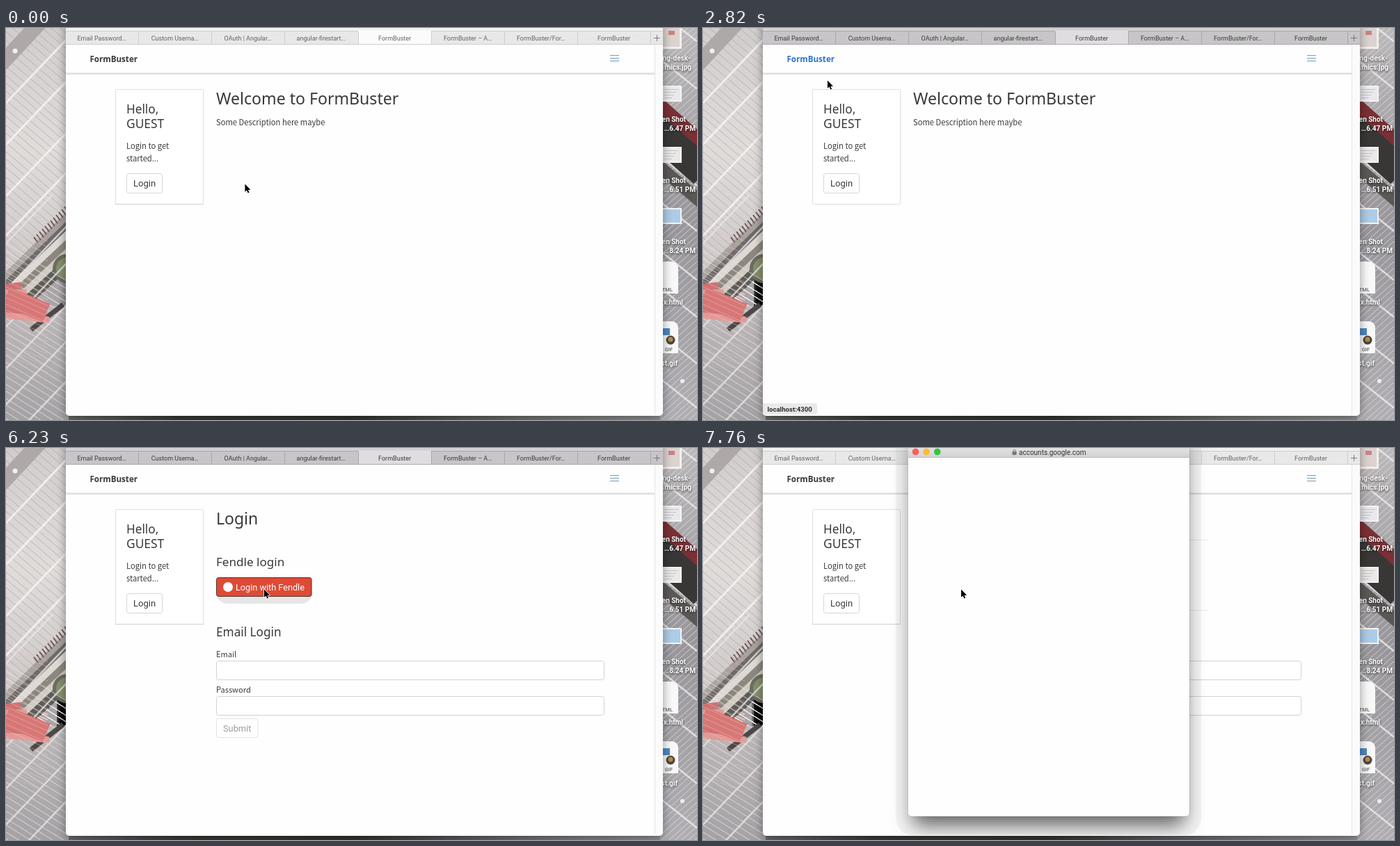
Recreate the animation shown at these times as an HTML page with a canvas. Size 993 by 564 pixels, loop 8 s.

```html
<!DOCTYPE html>
<html lang="en">
<head>
<meta charset="utf-8">
<title>FormBuster</title>
<style>
html, body { margin: 0; width: 100%; height: 100%; overflow: hidden; background: #aaa6a8; }
canvas { display: block; width: 993px; height: 564px; }
</style>
</head>
<body>
<canvas id="stage" width="993" height="564"></canvas>
<script>
const W = 993, H = 564, LOOP = 8000;
const WIN = { x: 86, w: 858, bottom: 558 };
const POP = { x: 294.5, w: 404.5, bottom: 530 };
const COL = 302, CARD = 173;

// Moments at which the page changes, in ms
const AT = {
  focus: 1030, hover: 1330, leave: 2970, status: 3110, loginHot: 3700, loginHand: 4000,
  page: 4600, loginCool: 5190, buttonHot: 5490, buttonHand: 5790, press: 6090,
  popup: 6380, popupReady: 6560, redirect: 7010, accounts: 7610
};
const during = (t, from, to) => t >= from && t < to;

const HEAD = '"Noto Sans", "Open Sans", sans-serif';
const BODY = '"Noto Sans CJK JP", "Noto Sans CJK SC", "Noto Sans", sans-serif';
const UI = 'Roboto, Inter, sans-serif';
const INK = '#373a3c';

let g = document.getElementById('stage').getContext('2d');

function text(s, x, y, size, family, color = INK, weight = 400, align = 'left') {
  g.font = `${weight} ${size}px ${family}`;
  g.fillStyle = color;
  g.textAlign = align;
  g.fillText(s, x, y);
}

function rect(x, y, w, h, color) {
  g.fillStyle = color;
  g.fillRect(x, y, w, h);
}

function box(x, y, w, h, r, fill, stroke) {
  g.beginPath();
  g.roundRect(x, y, w, h, r);
  if (fill) { g.fillStyle = fill; g.fill(); }
  if (stroke) { g.strokeStyle = stroke; g.lineWidth = 1; g.stroke(); }
}

function dot(x, y, r, color) {
  g.beginPath();
  g.arc(x, y, r, 0, Math.PI * 2);
  g.fillStyle = color;
  g.fill();
}

function line(color, width, x1, y1, x2, y2) {
  g.beginPath();
  g.moveTo(x1, y1);
  g.lineTo(x2, y2);
  g.strokeStyle = color;
  g.lineWidth = width;
  g.stroke();
}

function shadow(color, blur, dy) {
  g.shadowColor = color;
  g.shadowBlur = blur;
  g.shadowOffsetY = dy;
}

function fade(x, y, w, h, across, ...colors) {
  const f = across ? g.createLinearGradient(x, 0, x + w, 0) : g.createLinearGradient(0, y, 0, y + h);
  colors.forEach((c, i) => f.addColorStop(i / (colors.length - 1), c));
  rect(x, y, w, h, f);
}

function clipped(x, y, w, h, paint) {
  g.save();
  g.beginPath();
  g.rect(x, y, w, h);
  g.clip();
  paint();
  g.restore();
}

let seed = 7;
function random() {
  seed = (seed * 16807) % 2147483647;
  return seed / 2147483647;
}

// Parallel roof ribs: slanted lines with slightly uneven spacing
function ribs(x, w, top, bottom, slope, gap, color, width) {
  for (let y = top - 90; y < bottom + 90; y += gap * (0.85 + random() * 0.3)) {
    line(color, width, x, y, x + w, y + slope * w);
  }
}

function paintLeft() {
  fade(0, 0, 90, 350, false, '#d2cdcd', '#e0dcda', '#cdc9c8');
  clipped(0, 0, 90, 350, () => {
    ribs(0, 90, 0, 350, 0.85, 12, 'rgba(150,142,143,.5)', 1);
    ribs(0, 90, 0, 350, -1.05, 66, 'rgba(246,244,243,.85)', 3);
    line('#aea8a9', 22, 60, -20, -10, 55);
  });
  clipped(0, 240, 90, H - 240, () => {
    const stands = ['#a8a29e', '#6f6a67', '#ddd9d4', '#8c8880', '#d0ccc3', '#5d5c56'];
    stands.forEach((c, i) => line(c, 14, -5, 365 + i * 12, 95, 267 + i * 13));
    for (let i = 0; i < 12; i++) line('#6d5655', 2, 40 + i * 4, 301 - i * 4, 46 + i * 4, 309 - i * 4);
    dot(88, 346, 21, '#6c6c60');
    dot(88, 346, 16, '#85906b');
    fade(0, 400, 90, H - 400, false, '#bcb8b9', '#a5a2a5');
    ribs(0, 90, 400, H, 0.62, 10, 'rgba(238,235,236,.75)', 1);
    ribs(0, 90, 400, H, -1.05, 58, 'rgba(232,229,230,.8)', 2.5);
    line('#4d4745', 7, 36, 434, 82, 398);
    for (let i = 0; i < 6; i++) line(i % 2 ? '#e39a97' : '#d27072', 9, -4, 373 + i * 8, 22 + i * 8, 370 + i * 10);
    line('#d77776', 28, 0, 386, 58, 410);
    ribs(0, 60, 370, 380, 0.45, 9, 'rgba(240,200,196,.45)', 1);
  });
  dot(13, 33, 3.5, '#f1efef');
}

function paintRight() {
  fade(940, 0, 53, H, false, '#bbb8ba', '#98969a', '#b0aeb2');
  clipped(940, 0, 53, H, () => {
    ribs(940, 53, 0, H, -0.9, 9, 'rgba(238,237,239,.65)', 1);
    ribs(940, 53, 0, H, 0.8, 62, 'rgba(240,239,240,.75)', 2.5);
    line('#7a3035', 20, 930, 103, 1003, 168);
    line('#393736', 44, 930, 143, 1003, 208);
    line('#5a5755', 18, 930, 192, 1003, 254);
  });
  dot(972, 508, 3, '#eeeeee');
}

function label(s, x, y) {
  g.save();
  shadow('rgba(0,0,0,.75)', 3, 1);
  text(s, x, y, 10, UI, '#fff', 700, 'right');
  g.restore();
}

function thumb(y, color) {
  rect(938, y, 33, 23, '#f4f4f4');
  rect(940, y + 2, 29, 19, color);
  for (let i = 0; i < 4; i++) rect(946, y + 5 + i * 4, 20 - i * 3, 1, '#c4c5c9');
}

function fileIcon(y, tag) {
  box(930, y, 36, 46, [0, 9, 0, 0], '#f8f8f8');
  text(tag, 958, y + 43, 7.5, UI, '#666', 500, 'right');
}

function paintIcons() {
  rect(938, -6, 33, 36, '#f3efed');
  rect(942, 0, 26, 27, '#dcd3d0');
  rect(952, 4, 9, 6, '#c98582');
  label('ng-desk-', 984, 47);
  label('…mics.jpg', 985, 60);
  const shots = [['6.47', '#e9e9ec'], ['6.51', '#ebe9e8'], ['8.24', '#a9cdec']];
  shots.forEach(([time, color], i) => {
    const y = 83 + i * 88;
    thumb(y, color);
    label('en Shot', 977, y + 52);
    label(`…${time} PM`, 991, y + 64.5);
  });
  fileIcon(336, 'TML');
  label('x.html', 973, 398);
  fileIcon(422, 'GIF');
  rect(940, 432, 14, 10, '#4f86c0');
  dot(955, 449, 6.5, '#4a4642');
  dot(955, 448, 3.5, '#b58b45');
  label('st.gif', 965, 486);
}

function paintDesktop() {
  fade(0, 550, W, 14, true, '#8a8789', '#3a3d38', '#34362f', '#777577', '#a09ea1');
  paintLeft();
  paintRight();
  paintIcons();
}

const desktop = document.createElement('canvas');
desktop.width = W;
desktop.height = H;
const screen = g;
g = desktop.getContext('2d');
paintDesktop();
g = screen;

const TABS = ['Email Password…', 'Custom Userna…', 'OAuth | Angular…', 'angular-firestart…',
  'FormBuster', 'FormBuster – A…', 'FormBuster/For…', 'FormBuster'];
const TAB_W = 105.15, CURRENT = 4;
const FOCUSED = { top: '#d3d1d3', tab: '#c7c5c7', current: '#dfdddf', edge: '#a9a8a9', ink: '#3b3b3b' };
const BLURRED = { top: '#f3f2f3', tab: '#e9e8e9', current: '#fbfbfb', edge: '#cfcecf', ink: '#626262' };

function drawTabs(c) {
  const left = i => 85 + Math.round(i * TAB_W);
  rect(WIN.x, 0, WIN.w, 4, c.top);
  rect(WIN.x, 4, WIN.w, 20, c.edge);
  rect(WIN.x, 5, WIN.w, 18, c.tab);
  rect(left(CURRENT), 4, TAB_W, 19, c.current);
  TABS.forEach((s, i) => {
    rect(left(i + 1), 5, 1, 18, c.edge);
    text(s, left(i) + TAB_W / 2, 17.5, 9, UI, c.ink, 400, 'center');
  });
  rect(931, 14, 9, 1, '#777');
  rect(935, 10, 1, 9, '#777');
}

function drawWindow(t, focused) {
  g.save();
  shadow('rgba(0,0,0,.4)', 14, 4);
  box(WIN.x, -10, WIN.w, WIN.bottom + 10, 5, '#fefefe');
  g.restore();
  drawTabs(focused ? FOCUSED : BLURRED);
  rect(WIN.x, 64, 847, 1, '#ececec');
  rect(WIN.x, 65, 847, 2, '#dfdfdf');
  rect(933, 24, 11, 529, '#fbfbfb');
  rect(932, 24, 1, 533, '#e6e6e6');
  const hot = during(t, AT.hover, AT.leave);
  text('FormBuster', 120.5, 48.5, 11.6, HEAD, hot ? '#2f72d4' : INK, 700);
  for (let i = 0; i < 3; i++) rect(868, 39 + i * 4, 13, 1, '#6f9dbb');
  if (during(t, AT.hover, AT.status)) {
    box(WIN.x, 540, 78, 16, [0, 3, 3, 0], '#e9e9e9');
    text('localhost:4300', 92.5, 552, 9.6, UI, '#2b2b2b', 700);
  }
}

function drawCard(t) {
  box(157.5, 88.5, 126, 165, 1, '#fff', '#dedede');
  if (t < AT.focus || t >= AT.leave) rect(157, 253, 127, 1, '#cfcfcf');
  text('Hello,', CARD, 122.5, 17.2, HEAD);
  text('GUEST', CARD, 144, 17.4, HEAD);
  text('Login to get', CARD, 173.5, 11.2, BODY);
  text('started...', CARD, 192, 11.2, BODY);
  const hot = during(t, AT.loginHot, AT.loginCool);
  box(CARD + 0.5, 209.5, 51, 28, 3, hot ? '#e9e9e9' : '#fff', hot ? '#b5b5b5' : '#d5d5d5');
  text('Login', 183, 228.3, 13, UI);
}

function drawWelcome() {
  text('Welcome to FormBuster', COL, 110, 23.1, HEAD);
  text('Some Description here maybe', COL, 139.5, 11.2, BODY);
}

function field(name, y) {
  text(name, COL, y - 5, 11.1, BODY);
  box(COL + 0.5, y + 0.5, 557, 27, 3, '#fff', '#d2d2d2');
}

function drawLogin(t) {
  text('Login', COL, 110, 23, HEAD);
  const ruleEnd = t < AT.press ? 860 : t < AT.popup ? COL : 725;
  for (const y of [132, 233]) rect(COL, y, ruleEnd - COL, 1, '#e7e7e7');
  text('Fendle login', COL, 170, 17.1, HEAD);
  const hot = t >= AT.buttonHot;
  if (hot) box(COL, 192, 138, 32, [4, 4, 16, 16], '#e6e6e6');
  box(COL + 0.5, 186.5, 136.5, 27, 3, '#dd4b37', hot ? '#5e2f29' : '#d9503e');
  dot(319, 200, 7, '#fff');
  text('Login with Fendle', 330, 204.8, 12.7, UI, '#fff');
  text('Email Login', COL, 271, 17.2, HEAD);
  field('Email', 306);
  field('Password', 357);
  box(COL + 0.5, 389.5, 59.5, 27, 3, '#fff', '#e2e2e2');
  text('Submit', 312, 408, 12.8, UI, '#9d9d9d');
}

function drawTitle(s, x, locked) {
  if (locked) {
    box(x - 9.5, 5, 6, 5, 0.5, '#777');
    box(x - 8.3, 2.5, 3.6, 4, 1.8, null, '#777');
  }
  text(s, x, 9.6, 10, UI, '#333');
}

function drawPopup(t) {
  const ready = t >= AT.popupReady;
  clipped(WIN.x, 0, WIN.w, WIN.bottom - 1, () => {
    if (ready) box(277, -30, 439, 588, 26, 'rgba(0,0,0,.04)');
    shadow('rgba(0,0,0,.6)', ready ? 28 : 18, 15);
    box(POP.x + 7, -20, POP.w - 14, POP.bottom + 18, 8, '#fefefe');
  });
  box(POP.x, -20, POP.w, POP.bottom + 20, 5, '#fefefe', 'rgba(0,0,0,.12)');
  fade(POP.x, 0, POP.w, 14, false, '#e3e2e3', '#d2d0d2');
  rect(POP.x, 13, POP.w, 1, '#bdbbbd');
  ['#fb5f57', '#fcbb2f', '#30c740'].forEach((c, i) => dot(305.5 + i * 15.6, 5.5, 4.8, c));
  if (t < AT.redirect) drawTitle('localhost', 450);
  else if (t < AT.accounts) drawTitle('formbuster-app.firebaseapp.com', 422, true);
  else drawTitle('accounts.google.com', 454, true);
}

// Each leg of the pointer bends from its start towards a control point
const TICK = 148;
const START = [343.4, 224.5], BRAND = [149.5, 45.5], LOGIN = [206.5, 225], BUTTON = [371, 203.5];
const smooth = u => u * u * (3 - 2 * u);
const linear = u => u;
const LEGS = [
  { at: 140, steps: 5, from: START, bend: [245, 130], to: BRAND, ease: smooth },
  { at: 2820, steps: 8, from: BRAND, bend: [280, 170], to: LOGIN, ease: linear },
  { at: 5040, steps: 4, from: LOGIN, bend: [283, 272], to: BUTTON, ease: linear }
];

function pointerAt(t) {
  const leg = LEGS.filter(l => l.at <= t).pop();
  if (!leg) return START;
  const step = Math.floor((t - leg.at) / TICK) + 1;
  const u = leg.ease(Math.min(1, step / leg.steps)), v = 1 - u;
  return leg.from.map((a, i) => v * v * a + 2 * u * v * leg.bend[i] + u * u * leg.to[i]);
}

const ARROW = new Path2D('M0 0V11.3L2.6 9L4.3 12.9L6.1 12.1L4.5 8.4L8 8.2Z');
const HAND = new Path2D('M0 8V1Q1.1-.8 2.2 1V5L7.5 6Q9 6.5 8.8 9L7.4 14H1L-3 8.5Q-2.4 6.8 0 9Z');

function drawPointer(t) {
  const hand = during(t, AT.hover, 2820) || during(t, AT.loginHand, AT.page) ||
    during(t, AT.buttonHand, AT.press);
  const shape = hand ? HAND : ARROW;
  g.save();
  g.translate(...pointerAt(t));
  g.lineJoin = 'round';
  g.lineWidth = 1.4;
  g.strokeStyle = hand ? '#111' : '#fff';
  g.fillStyle = hand ? '#fff' : '#000';
  g.stroke(shape);
  g.fill(shape);
  g.restore();
}

function draw(t) {
  const popup = t >= AT.popup;
  g.drawImage(desktop, 0, 0);
  drawWindow(t, t >= AT.focus && !popup);
  drawCard(t);
  if (t < AT.page) drawWelcome();
  else drawLogin(t);
  if (popup) drawPopup(t);
  drawPointer(t);
}

function tick() {
  draw(performance.now() % LOOP);
  requestAnimationFrame(tick);
}
tick();
</script>
</body>
</html>
```
